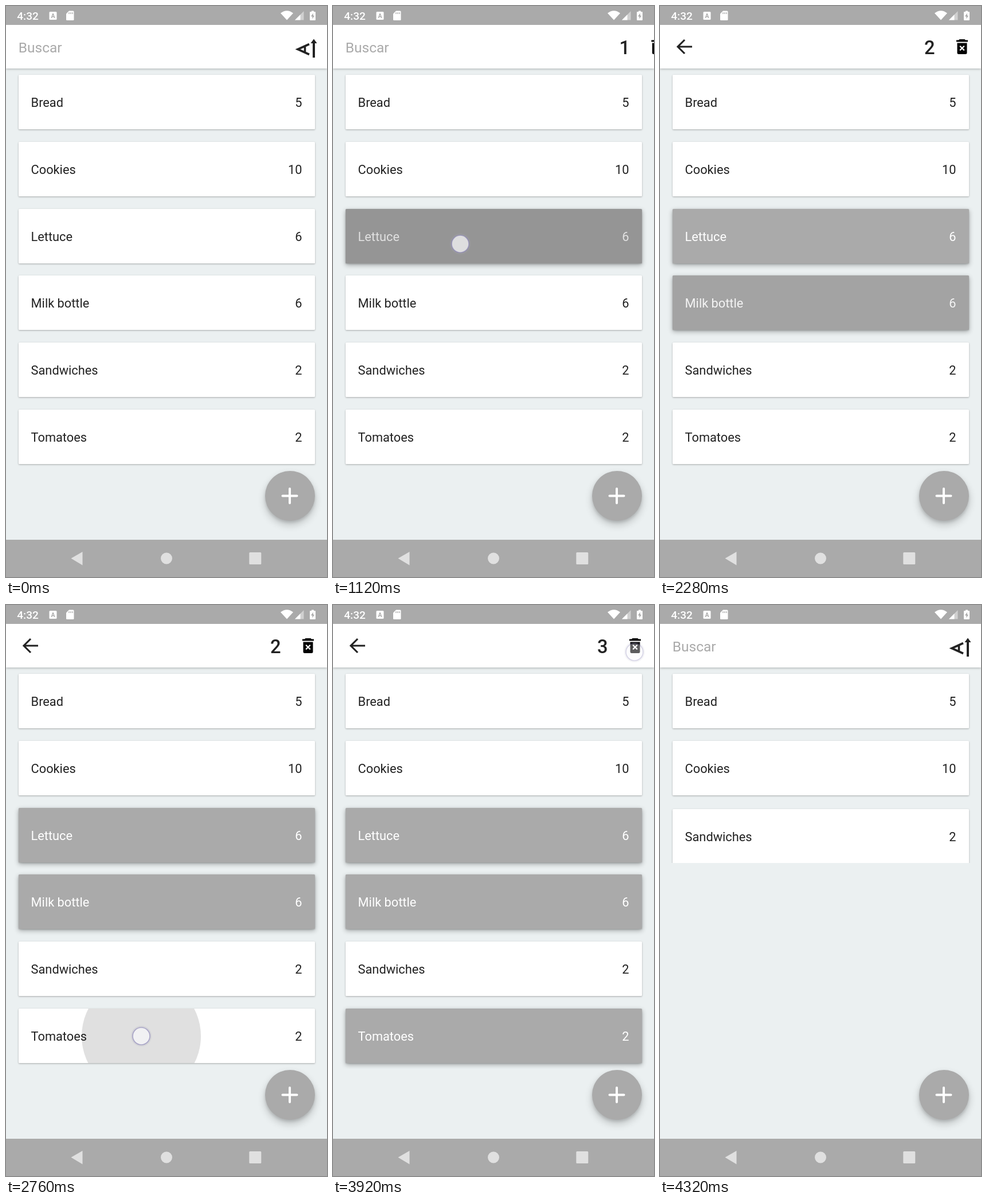
An HTML page for the animation above (5 s loop, 560x996 px).

```html
<!DOCTYPE html>
<html lang="es">
<head>
<meta charset="utf-8">
<title>Shopping list</title>
<style>
html, body { margin: 0; width: 100%; height: 100%; overflow: hidden; background: #ebf0f1; }
body { position: relative; font-family: Roboto, sans-serif; }
#list { position: absolute; left: 0; top: 0; width: 560px; overflow: hidden; }
.card {
  position: absolute; left: 22px; width: 516.5px; height: 95px; border-radius: 1.5px;
  box-sizing: border-box; padding: 0 22px 0 21.6px; display: flex; justify-content: space-between;
  font-size: 21.78px; line-height: 97px; color: #222; background: #fff;
  box-shadow: 0 1px 3px rgba(0,0,0,.3);
}
.card.on { background: #aaa; color: #fff; box-shadow: 0 3px 9px rgba(0,0,0,.3), 0 1px 3px rgba(0,0,0,.2); }
.card i { position: absolute; inset: 0; background: #000; border-radius: 1.5px; }
#bar { position: absolute; left: 0; top: 33px; width: 560px; height: 76px; background: #fff; box-shadow: 0 1px 4px rgba(0,0,0,.28); }
#fab { position: absolute; left: 451.5px; top: 811px; width: 87px; height: 87px; border-radius: 50%; background: #aaa; box-shadow: 0 7px 14px rgba(0,0,0,.2), 0 3px 5px rgba(0,0,0,.12); }
svg { position: absolute; left: 0; top: 0; }
</style>
</head>
<body>
<div id="list"></div>
<div id="bar"></div>
<div id="fab"></div>
<svg width="560" height="996" viewBox="0 0 560 996">
  <path fill="#aaa" d="M0 0H560V33H0zM0 931H560V996H0z"/>
  <!-- status bar -->
  <g fill="#fff">
    <text x="19.3" y="24" font-size="19.06" font-weight="500">4:32</text>
    <rect x="75.5" y="10" width="13" height="14" rx="1.5"/>
    <path d="M110 8.5H117Q118.500 8.500 118.500 10V23.500Q118.500 25 117 25H106.500Q105 25 105 23.500V13.500z"/>
    <path d="M490 24.500L479 12.500Q490 4 501 12.500z"/>
    <path d="M519.500 9V24.500H504z" opacity=".45"/>
    <path d="M513.500 15V24.500H504z"/>
    <path d="M533 10V8.500H537V10H539Q540 10 540 11V24Q540 25 539 25H531Q530 25 530 24V11Q530 10 531 10z"/>
  </g>
  <text x="82" y="21" font-size="10.500" font-weight="700" text-anchor="middle" fill="#aaa">A</text>
  <path d="M110 11V14M113 11V14M116 11V14" stroke="#aaa" stroke-width="1.300"/>
  <path d="M535.800 12.500L532 18.300H534.500V22.500L538 16.700H535.800z" fill="#aaa"/>
  <!-- toolbar -->
  <text id="search" x="21.8" y="81" font-size="24.5" fill="#aaa">Buscar</text>
  <path id="back" d="M56 71H31M43 59L31 71L43 83" fill="none" stroke="#222" stroke-width="3.1"/>
  <g id="sort" stroke="#222" fill="none">
    <path d="M529 66.500L509 75.500L529 84.500M521.500 70V81" stroke-width="3.600"/>
    <path d="M537 63V90" stroke-width="4"/>
    <path d="M531.500 65L537 57.500L542.500 65z" fill="#222" stroke="none"/>
  </g>
  <g id="actions">
    <text id="count" x="470.3" y="83.500" font-size="32.700" font-weight="500" text-anchor="middle" fill="#222"></text>
    <path d="M522.500 58H531.500L533 59.500H537V62.500H517V59.500H521zM518.500 64.500H535.500V81.500Q535.500 84 533 84H521Q518.500 84 518.500 81.500z"/>
    <path d="M523.200 69.800L530.800 77.400M530.800 69.800L523.200 77.400" stroke="#fff" stroke-width="2.200"/>
  </g>
  <!-- button and navigation -->
  <path d="M482.500 854.500H507.500M495 842V867" stroke="#fff" stroke-width="4" stroke-linecap="round"/>
  <g fill="#e0e0e0">
    <path d="M113.500 963.500L133.500 952V975.500z"/>
    <circle cx="280" cy="963.500" r="10"/>
    <rect x="424.300" y="953" width="21" height="21" rx="1.500"/>
  </g>
  <g id="touch">
    <circle r="18" fill="#aab" opacity=".22"/>
    <circle r="15" fill="#fff" fill-opacity=".68" stroke="#8c86b8" stroke-opacity=".65" stroke-width="1.700"/>
  </g>
</svg>
<script>
const $ = id => document.getElementById(id);
const clamp = x => Math.max(0, Math.min(1, x));
const ease = x => (1 - Math.cos(Math.PI * clamp(x))) / 2;
const LOOP = 5000, TICK = 40, GAP = 116.75, TOP = 120;
const OPEN = 1090, CLOSE = 3955, REMOVE = 3946, MOVE = 4066, SETTLED = 4320;

const items = [['Bread', 5], ['Cookies', 10], ['Lettuce', 6], ['Milk bottle', 6], ['Sandwiches', 2], ['Tomatoes', 2]];
// x, y, press, gone; for rows also: row, selection, release, ripple cleared
const touches = [
  { x: 222, y: 415, press: 800, gone: 1280, row: 2, select: OPEN, release: 1240, clear: 1560 },
  { x: 226, y: 500, press: 1960, gone: 2160, row: 3, select: 2080, release: 2080, clear: 2720 },
  { x: 236, y: 752, press: 2720, gone: 2920, row: 5, select: 2840, release: 2840, clear: 3920 },
  { x: 526, y: 82, press: 3920, gone: 4065 }
];

const cards = items.map(([name, amount]) => {
  const card = document.createElement('div');
  card.className = 'card';
  card.innerHTML = `<span>${name}</span><span>${amount}</span><i></i>`;
  return $('list').appendChild(card);
});

const show = (id, on) => $(id).style.display = on ? '' : 'none';
const slide = (id, from, start, t) =>
  $(id).setAttribute('transform', `translate(${from * (1 - clamp((t - start) / 150)) ** 2} 0)`);

function drawCard(card, row, t) {
  const tap = touches.find(p => p.row === row);
  const rise = row === 4 ? 2 * GAP * ease((t - MOVE) / 270) : 0;
  const top = TOP + row * GAP - rise;
  card.style.top = top + 'px';
  card.classList.toggle('on', !!tap && t >= tap.select);
  card.style.opacity = tap ? 1 - ease((t - REMOVE) / 120) : 1;
  const ripple = card.lastChild;
  const active = tap && t >= tap.press && t < tap.clear;
  ripple.style.opacity = active ? .12 * (1 - clamp((Math.min(t, tap.release + 200) - tap.release) / 320)) : 0;
  if (active) {
    const radius = 40 + 360 * clamp((t - tap.press) / 225);
    ripple.style.clipPath = `circle(${radius}px at ${tap.x - 22}px ${tap.y - top}px)`;
  }
}

function draw(t) {
  cards.forEach((card, row) => drawCard(card, row, t));
  $('list').style.height = (t >= SETTLED ? 450 : 809) + 'px';

  const acting = t >= OPEN && t < CLOSE;
  const back = t >= OPEN + 50 && t < CLOSE;
  show('actions', acting);
  show('sort', !acting);
  show('back', back);
  show('search', !back);
  slide('actions', 60, OPEN, t);
  slide('sort', t < CLOSE ? 0 : -60, CLOSE, t);
  $('sort').style.opacity = t < CLOSE ? 1 : clamp((t - CLOSE) / 95);
  $('count').textContent = touches.filter(p => t >= p.select).length;

  const tap = touches.find(p => t >= p.press && t < p.gone);
  show('touch', tap);
  if (tap) {
    $('touch').setAttribute('transform', `translate(${tap.x} ${tap.y})`);
    $('touch').style.opacity = clamp(Math.min((t - tap.press) / 80 + .5, (tap.gone - t) / 100));
  }
}

const begin = performance.now();
function frame() {
  const t = (performance.now() - begin) % LOOP;
  draw(Math.min(Math.floor(t / TICK) * TICK, SETTLED));
  requestAnimationFrame(frame);
}
frame();
</script>
</body>
</html>
```
